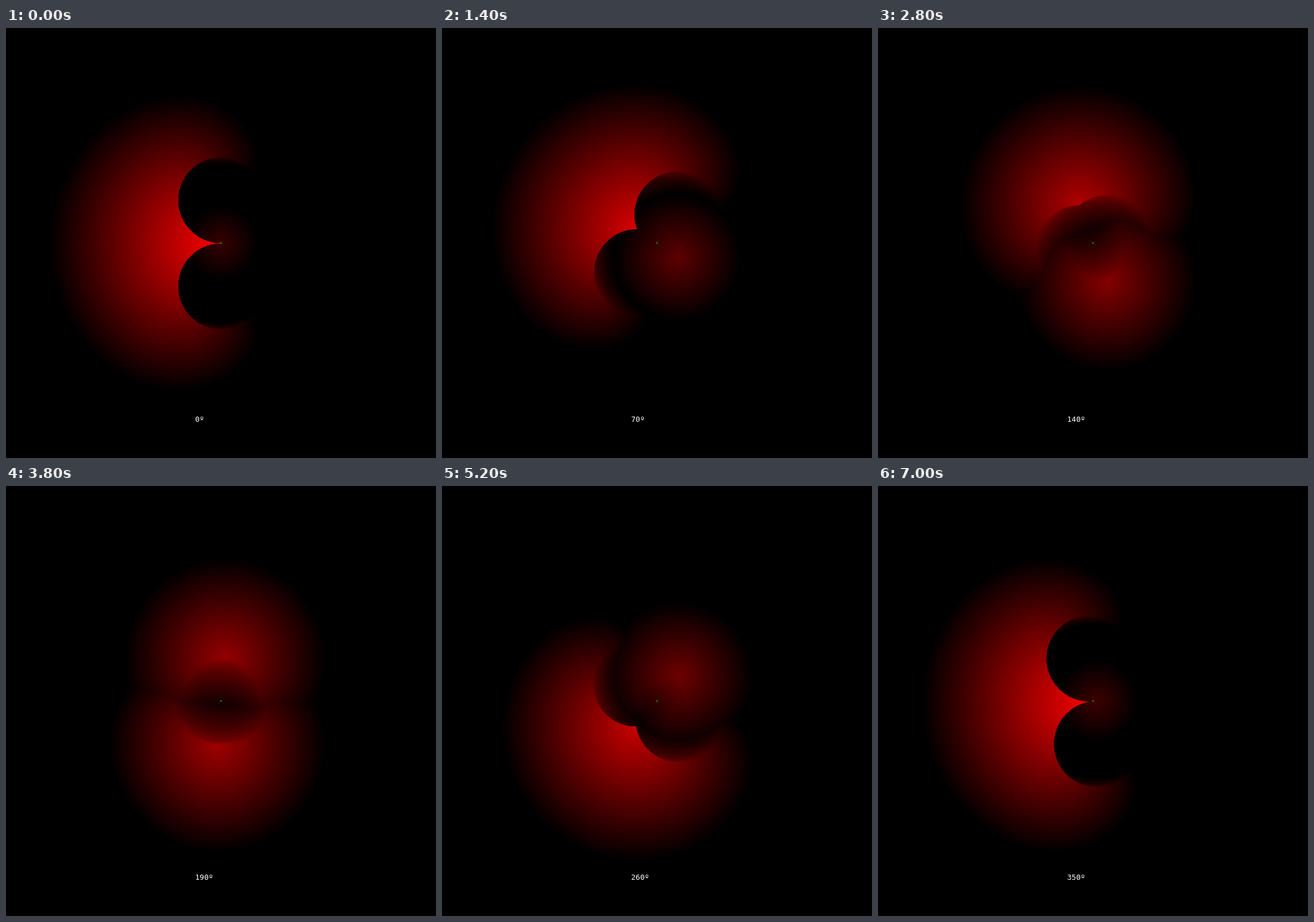
Write an HTML page with a canvas that moves like this. It is 748 px wide and 748 px high and loops after 7200 ms.

```html
<!DOCTYPE html>
<html lang="en">
<head>
<meta charset="utf-8">
<title>Shortest curved paths by heading</title>
<style>
html, body { margin: 0; width: 100%; height: 100%; overflow: hidden; background: #000; }
canvas, svg { position: absolute; left: 0; top: 0; width: 748px; height: 748px; display: block; }
text { font: 13px "DejaVu Sans Mono", monospace; fill: #fff; }
</style>
</head>
<body>
<canvas id="field" width="748" height="748"></canvas>
<svg viewBox="0 0 748 748">
  <rect x="373" y="373" width="2" height="2" fill="#00c800"/>
  <text id="label" x="329" y="685">0º</text>
</svg>
<script>
const SIZE = 748, MID = SIZE / 2;
const UNIT = SIZE / 20;      // turning radius in pixels
const REACH = 8;             // path length, in radii, that fades to black
const STEP = 200, STEPS = 36;
const TAU = 2 * Math.PI;

const ctx = document.getElementById('field').getContext('2d');
const label = document.getElementById('label');
const image = ctx.createImageData(SIZE, SIZE);
const cache = [];

const wrap = a => a - TAU * Math.floor((a + 1e-9) / TAU);

// Shortest Dubins path that begins with a left turn: LSL, LSR or LRL.
function leftFirst(x, y, h, sin, cos, best) {
  let dx = x - sin, dy = y + cos - 1;
  let d = Math.sqrt(dx * dx + dy * dy);
  if (d < best) {
    const a = Math.atan2(dy, dx);
    best = Math.min(best, wrap(a) + d + wrap(h - a));
    if (d <= 4) {
      const e = Math.acos(d / 4), mid = Math.PI + 2 * e;
      if (mid < best) {
        const first = wrap(a + e + Math.PI / 2);
        const last = wrap(h - a + e - 1.5 * Math.PI);
        best = Math.min(best, first + mid + last);
      }
    }
  }
  dx = x + sin;
  dy = y - cos - 1;
  d = dx * dx + dy * dy;
  if (d >= 4) {
    const s = Math.sqrt(d - 4);
    if (s < best) {
      const a = Math.atan2(dy, dx) + Math.atan2(2, s);
      best = Math.min(best, wrap(a) + s + wrap(a - h));
    }
  }
  return best;
}

function reds(step) {
  const h = step * TAU / STEPS, sin = Math.sin(h), cos = Math.cos(h);
  const out = new Uint8ClampedArray(SIZE * SIZE);
  const edge = Math.ceil(REACH * UNIT);
  for (let py = MID - edge; py <= MID + edge; py++) {
    const y = (MID - py) / UNIT;
    for (let px = MID - edge; px <= MID + edge; px++) {
      const x = (MID - px) / UNIT;
      if (x * x + y * y > REACH * REACH) continue;
      let len = leftFirst(x, y, h, sin, cos, REACH);
      len = leftFirst(x, -y, -h, -sin, cos, len);   // right turn first, mirrored
      out[py * SIZE + px] = 255 * (1 - len / REACH);
    }
  }
  return out;
}

let shown = -1;
function draw(now) {
  const step = Math.floor(now / STEP) % STEPS;
  if (step !== shown) {
    shown = step;
    const red = cache[step] || (cache[step] = reds(step));
    const data = image.data;
    for (let i = 0, j = 0; i < red.length; i++, j += 4) {
      data[j] = red[i];
      data[j + 3] = 255;
    }
    ctx.putImageData(image, 0, 0);
    label.textContent = step * 360 / STEPS + 'º';
  }
  requestAnimationFrame(draw);
}
draw(0);
</script>
</body>
</html>
```
